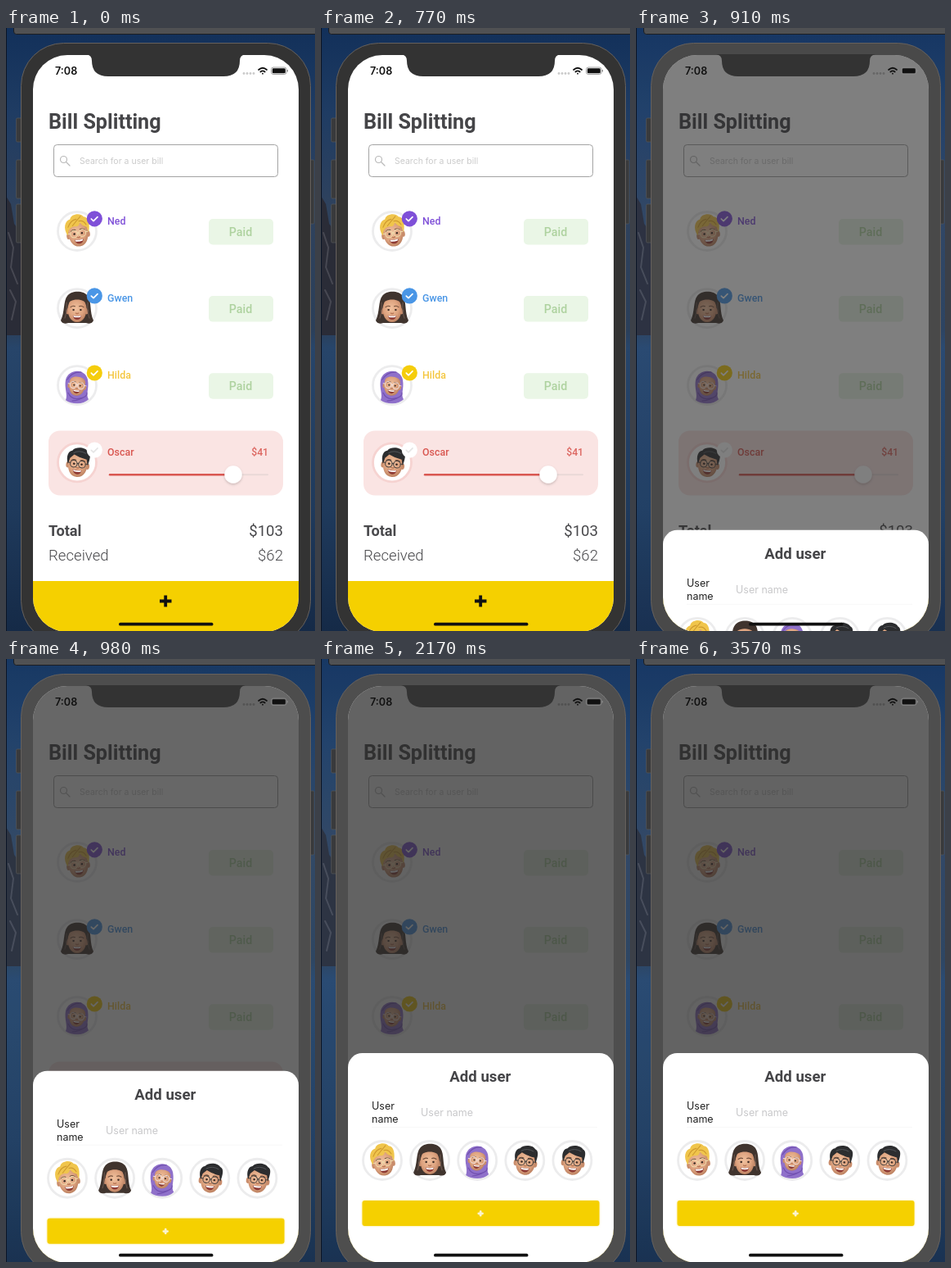
An HTML page for the animation above (3.64 s loop, 378 by 736 pixels).

```html
<!DOCTYPE html>
<html lang="en">
<head>
<meta charset="utf-8">
<title>Bill Splitting</title>
<style>
  html, body { margin: 0; width: 100%; height: 100%; overflow: hidden; background: #1b3658; }
  svg { display: block; width: 100%; height: 100%; font-family: Roboto, sans-serif; }
  .inter { font-family: Inter, sans-serif; }
  .bold { font-weight: 700; }
  .medium { font-weight: 500; }
  .light { font-weight: 300; }
  .line { fill: none; stroke-linecap: round; stroke-linejoin: round; }
</style>
</head>
<body>
<svg viewBox="0 0 378 736">
  <defs>
    <clipPath id="screen"><rect x="33" y="33" width="325" height="704" rx="42"/></clipPath>
    <linearGradient id="sea" x2="0" y2="1">
      <stop offset="0" stop-color="#12305a"/>
      <stop offset=".14" stop-color="#1f3c63"/>
      <stop offset=".3" stop-color="#2f425d"/>
      <stop offset=".5" stop-color="#2b3f59"/>
      <stop offset=".53" stop-color="#27456a"/>
      <stop offset=".8" stop-color="#1f3a5c"/>
      <stop offset="1" stop-color="#152a47"/>
    </linearGradient>
    <radialGradient id="skin" cx=".45" cy=".4" r=".65">
      <stop offset="0" stop-color="#f0c19e"/>
      <stop offset=".6" stop-color="#dda27e"/>
      <stop offset="1" stop-color="#b67b5c"/>
    </radialGradient>
    <filter id="shadow" x="-50%" y="-50%" width="200%" height="200%">
      <feDropShadow dx="0" dy="1.5" stdDeviation="1.5" flood-opacity=".2"/>
    </filter>
    <filter id="halo" x="-5%" y="-30%" width="110%" height="160%">
      <feDropShadow dx="0" dy="0" stdDeviation="1" flood-color="#f5d000" flood-opacity=".5"/>
    </filter>

    <g id="face">
      <ellipse cx="-13" cy="2" rx="2.500" ry="4" fill="#c98d6c"/>
      <ellipse cx="13" cy="2" rx="2.500" ry="4" fill="#c98d6c"/>
      <path d="M-13-6C-13-17 13-17 13-6C14 8 9 17 0 17S-14 8-13-6Z" fill="url(#skin)"/>
      <path class="line" d="M-9-4q3-2.500 6-1M3-5q3-1.500 6 1" stroke="#6e4c39" stroke-width="1.300"/>
      <ellipse cx="-5" cy="0" rx="1.500" ry="1.300" fill="#3c2a24"/>
      <ellipse cx="5" cy="0" rx="1.500" ry="1.300" fill="#3c2a24"/>
      <path class="line" d="M-1.800 4.500q1.800 1.500 3.600 0" stroke="#b97656" stroke-width="1.500"/>
      <path d="M-6 7.500q6 1.500 12 0q-1 6-6 6T-6 7.500Z" fill="#8d3a34"/>
      <path d="M-5.500 7.800q5.500 1.300 11 0l-1 2.200q-4.500 1-9 0Z" fill="#fff"/>
    </g>
    <g id="glasses" class="line" stroke-width="1.100">
      <circle cx="-5.500" cy="0" r="4.600"/><circle cx="5.500" cy="0" r="4.600"/>
      <path d="M-1-.5q1-1 2 0M-10-1h-3M10-1h3"/>
    </g>

    <g id="blond" transform="translate(1 1) rotate(-8) scale(.93)">
      <use href="#face" transform="translate(0 2)"/>
      <use href="#glasses" transform="translate(0 2)" stroke="#f0dcae"/>
      <path d="M-14 3C-19-8-15-17-8-18C-6-25 7-25 10-19C17-18 17-7 14 2L12-5Q7-7 4-12Q2-6-3-8Q-9-8-12-3Z" fill="#f0c54c"/>
      <path class="line" d="M-12-8Q-7-17 0-17M-6-9Q0-15 6-20M3-14Q9-15 12-8" stroke="#cf9a30" stroke-width="1.200"/>
    </g>
    <g id="brunette">
      <path d="M-11 18Q-18 20-20 15C-15 5-17-9-12-15C-7-22 8-22 13-15C18-8 15 5 20 15Q18 20 11 18Z" fill="#40342e"/>
      <use href="#face" transform="translate(0 2) scale(.88)"/>
      <path d="M-13 3C-16-13-8-18 0-18S16-12 13 3Q11-4 9-9Q4-10 0-15Q-4-10-9-9Q-11-3-13 3Z" fill="#40342e"/>
      <path class="line" d="M-15 12Q-12 3-13-7M15 12Q12 3 13-7" stroke="#67534a" stroke-width="1.200"/>
    </g>
    <g id="scarf" transform="translate(0 1)">
      <path d="M-14 17C-11 10-16 3-14-8C-10-22 10-22 13-8C15 4 10 9 14 16Q9 21 0 21Q-9 21-14 17Z" fill="#8f70ca"/>
      <use href="#face" transform="translate(0 -1) rotate(8) scale(.74)"/>
      <use href="#glasses" transform="translate(0 -1) rotate(8) scale(.86)" stroke="#f0dfdd"/>
      <path class="line" d="M-11 8Q-7 17 3 15T12 8M-12-8Q-6-18 5-17M-6 18Q3 17 9 13" stroke="#7150b0" stroke-width="1.200"/>
    </g>
    <g id="dark" transform="translate(1 1) rotate(6) scale(.93)">
      <use href="#face" transform="translate(0 1)"/>
      <use href="#glasses" transform="translate(0 1)" stroke="#45403e"/>
      <path d="M-13 2C-17-8-14-15-9-16C-5-22 8-22 11-17C17-15 15-6 13 2L11-6Q2-7-6-11L-11-6Z" fill="#2c2d2f"/>
      <path class="line" d="M-7-13Q0-18 9-14" stroke="#55575a"/>
    </g>
  </defs>

  <rect width="378" height="736" fill="url(#sea)"/>
  <path d="M0 205l6 10 4 24 9 12v124h-19Z" fill="#2a2c37"/>
  <path d="M3 250l6 18-3 24 8 20M5 320l7 14-5 22" class="line" stroke="#474852" stroke-width="2"/>
  <rect id="glow" width="378" height="736" fill="#5c9de0" opacity="0"/>
  <path d="M.5 0v736" stroke="#0b1526"/>
  <path d="M9.500-1v5q0 3.500 3 3.500h366v-8.500Z" fill="#505153" stroke="#1c1e22"/>

  <g fill="#393a3c" stroke="#55565a" stroke-width=".7">
    <rect x="12.500" y="110" width="7" height="29" rx="1.500"/>
    <rect x="12.500" y="161" width="7" height="47" rx="1.500"/>
    <rect x="12.500" y="215" width="7" height="47" rx="1.500"/>
    <rect x="370" y="161" width="7" height="78" rx="1.500"/>
  </g>
  <rect id="bezel" x="18.500" y="18.500" width="354" height="733" rx="52" fill="#333" stroke="#66615d"/>

  <g clip-path="url(#screen)">
    <rect x="33" y="33" width="325" height="704" fill="#fff"/>
    <text class="bold" x="52" y="122.500" font-size="25.200" fill="#454548">Bill Splitting</text>
    <rect x="58.500" y="142.500" width="274" height="39" rx="4" fill="#fff" stroke="#a3a3a3"/>
    <g class="line" stroke="#b9b9b9" stroke-width="1.200"><circle cx="70.500" cy="160.500" r="4"/><path d="M73.500 163.500l4.500 4.500"/></g>
    <text class="inter" x="90" y="166" font-size="10.500" fill="#cbcbcb">Search for a user bill</text>

    <rect x="52" y="491.500" width="287" height="79" rx="14" fill="#fae4e3"/>
    <g id="rows"></g>
    <text class="medium" x="321" y="522" font-size="12.200" fill="#dc6660" text-anchor="end">$41</text>
    <path class="line" d="M278 545.200H320" stroke="#e9d9d8" stroke-width="2"/>
    <path class="line" d="M127 545.200H278" stroke="#d95751" stroke-width="2.400"/>
    <circle cx="278" cy="545" r="10.700" fill="#fff" filter="url(#shadow)"/>

    <g font-size="18.600" fill="#49494c">
      <text class="bold" x="52" y="620" font-size="18.200">Total</text>
      <text x="339" y="620" text-anchor="end">$103</text>
      <text class="light" x="52" y="650">Received</text>
      <text class="light" x="339" y="650" text-anchor="end">$62</text>
    </g>
    <rect x="33" y="675" width="325" height="62" fill="#f5d000"/>
    <path d="M188 699.500h14.500M195.200 692.500v14" stroke="#111" stroke-width="3.800"/>

    <rect id="shade" x="33" y="33" width="325" height="704" fill="#2a2a2a" opacity="0"/>

    <g id="sheet">
      <rect x="33" y="481" width="325" height="300" rx="17.500" fill="#fff"/>
      <text class="bold" x="194.800" y="516" font-size="18.600" fill="#454548" text-anchor="middle">Add user</text>
      <g class="inter" font-size="12.500" fill="#222">
        <text x="62" y="550">User</text>
        <text x="62" y="566">name</text>
        <text x="122" y="558" fill="#c8c8ca">User name</text>
      </g>
      <path d="M62 571.500H338" stroke="#f8f8f8"/>
      <rect id="caret" x="121.500" y="545" width="1.800" height="17" rx=".9" fill="#7384d6"/>
      <g id="choices"></g>
      <rect x="50.500" y="661" width="290" height="31" rx="3" fill="#f5d000" filter="url(#halo)"/>
      <path class="line" d="M192.800 676.800h4.800M195.200 674.400v4.800" stroke="#fbf3cc" stroke-width="2.800"/>
    </g>
  </g>

  <path d="M98 32q7 1 7 8q0 19 20 19h141q20 0 20-19q0-7 7-8Z" fill="#333"/>
  <text class="inter" x="60" y="57" font-size="12.600" font-weight="600" fill="#111">7:08</text>
  <g fill="#111" opacity=".22">
    <circle cx="291" cy="55.500" r="1.400"/><circle cx="295" cy="55.500" r="1.400"/>
    <circle cx="299" cy="55.500" r="1.400"/><circle cx="303" cy="55.500" r="1.400"/>
  </g>
  <g class="line" stroke="#111" stroke-width="1.700">
    <path d="M309 51q5-4.500 10 0M311.300 53.500q2.700-2.300 5.400 0M313.900 55.700h.2"/>
  </g>
  <rect x="324.500" y="48" width="18.500" height="8.500" rx="2.500" fill="none" stroke="#888" stroke-width=".8"/>
  <rect x="325.800" y="49.300" width="16" height="6" rx="1.400" fill="#111"/>
  <path d="M344.300 51v2.500" stroke="#888" stroke-width="1.200"/>
  <rect x="138" y="725.800" width="115.500" height="3.800" rx="1.900" fill="#111"/>
</svg>

<script>
  const LOOP = 3640, STEP = 70;
  const OPEN_AT = 790, OPEN_TIME = 275, TRAVEL = 736;
  const BLINK_AT = 1680, BLINK_PERIOD = 1000, BLINK_ON = 460, FADE = 100;
  const byId = id => document.getElementById(id);
  const clamp = x => Math.max(0, Math.min(1, x));

  const avatar = (kind, x, y, ring = '#ececed') =>
    `<g transform="translate(${x} ${y})"><circle r="23.500" fill="#fff" stroke="${ring}" stroke-width="2.800"/><use href="#${kind}"/></g>`;

  const people = [
    { name: 'Ned', kind: 'blond', color: '#7f50d8' },
    { name: 'Gwen', kind: 'brunette', color: '#4a96e6' },
    { name: 'Hilda', kind: 'scarf', color: '#f5cd0c', text: '#f4c63e' },
    { name: 'Oscar', kind: 'dark', color: '#fff', text: '#d95751', owing: true }
  ];

  byId('rows').innerHTML = people.map(({ name, kind, color, text = color, owing }, i) => `
    <g transform="translate(0 ${i * 94.1})">
      ${avatar(kind, 87, 248, owing ? '#f6d3d1' : undefined)}
      <circle cx="108.300" cy="232.800" r="9.600" fill="${color}"/>
      <path class="line" d="M104.300 233l2.700 2.600 5-5" stroke="${owing ? '#e5e5e5' : '#fff'}" stroke-width="1.700"/>
      <text class="medium" x="124" y="240" font-size="12.400" fill="${text}">${name}</text>
      ${owing ? '' : `<rect x="248" y="233" width="79" height="31.500" rx="5" fill="#eaf6e6"/>
      <text class="medium" x="287" y="253.500" font-size="14.200" fill="#aed29f" text-anchor="middle">Paid</text>`}
    </g>`).join('');

  byId('choices').innerHTML = ['blond', 'brunette', 'scarf', 'dark', 'dark']
    .map((kind, i) => avatar(kind, 75 + i * 58.1, 612)).join('');

  function draw(now) {
    const t = Math.floor(now % LOOP / STEP) * STEP;
    const open = 1 - (1 - clamp((t - OPEN_AT) / OPEN_TIME)) ** 3;
    byId('shade').setAttribute('opacity', 0.73 * open);
    byId('glow').setAttribute('opacity', 0.07 * open);
    byId('sheet').setAttribute('transform', `translate(0 ${TRAVEL * (1 - open)})`);
    const tone = Math.round(51 + 27 * open);
    byId('bezel').setAttribute('fill', `rgb(${tone},${tone},${tone})`);

    const blink = (t - BLINK_AT) % BLINK_PERIOD;
    const caret = t < BLINK_AT ? 0 : clamp(blink / FADE) * clamp((BLINK_ON - blink) / FADE);
    byId('caret').setAttribute('opacity', caret);
  }

  const start = performance.now();
  function tick() {
    draw(performance.now() - start);
    requestAnimationFrame(tick);
  }
  tick();
</script>
</body>
</html>
```
